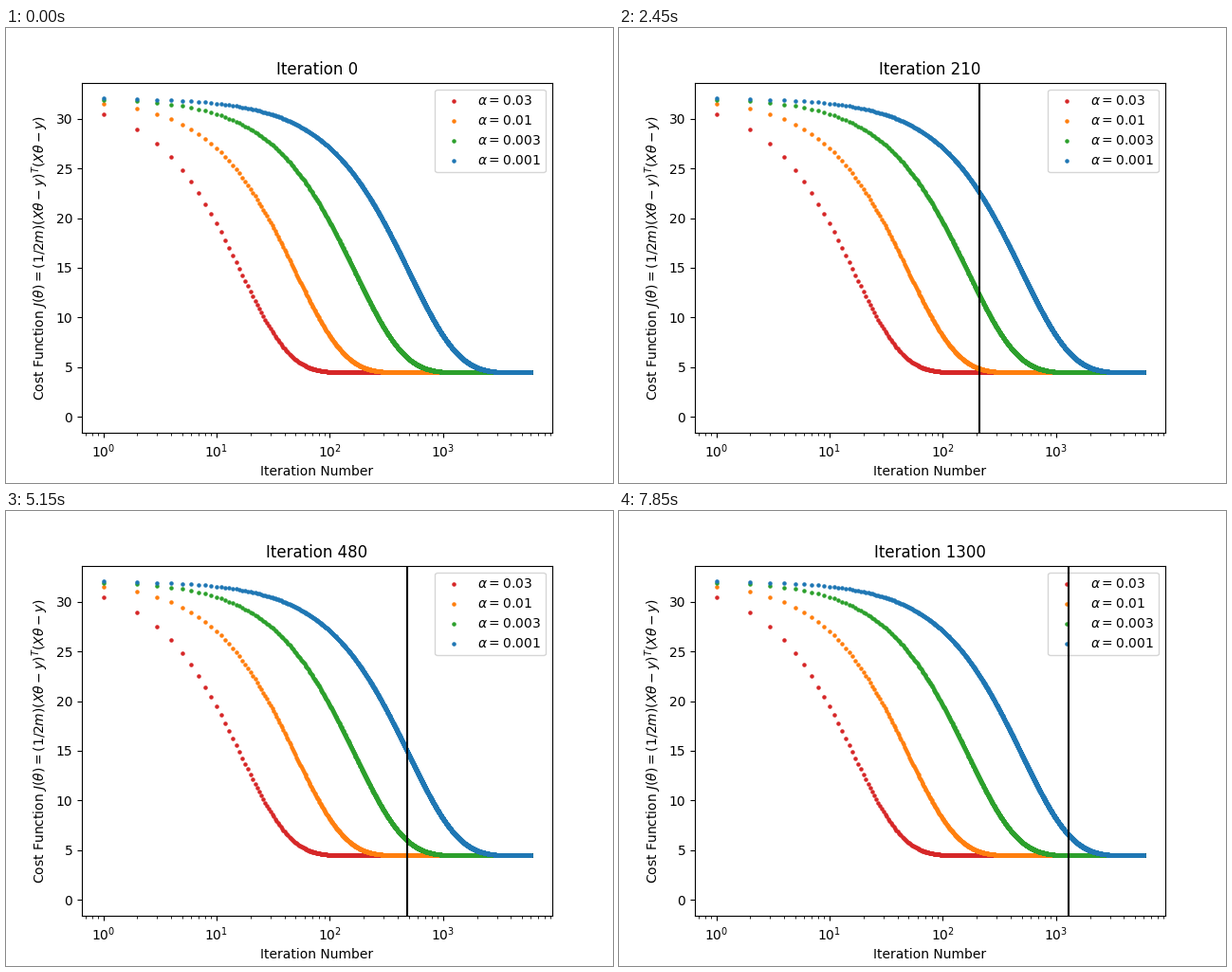
Animation of 640x480 px, one loop 8000 ms. Source, as a matplotlib script:

```python
import numpy as np
import matplotlib.pyplot as plt
from matplotlib.animation import FuncAnimation

TICK = 50            # ms per animation frame
LOOP = 8000          # ms per loop
HOLD, STEP = 500, 150
N = 6000
J_START, J_MIN = 32.0727, 4.477

# Fine steps first, then coarse ones
marks = [*range(0, 500, 15), *range(500, 1301, 50)]

k = np.arange(1, N)
rates = {"0.03": "tab:red", "0.01": "tab:orange",
         "0.003": "tab:green", "0.001": "tab:blue"}


def cost(alpha):
    """Gradient descent cost on one standardised feature."""
    return J_MIN + (J_START - J_MIN) * (1 - alpha) ** (2 * k)


fig, ax = plt.subplots(figsize=(6.4, 4.8), dpi=100)
for rate, color in rates.items():
    ax.scatter(k, cost(float(rate)), s=5, color=color, linewidths=1,
               label=rf"$\alpha = {rate}$")

top = cost(0.001)[0]
ax.set_xscale("log")
ax.set_xlim((N - 1) ** -0.05, (N - 1) ** 1.05)
ax.set_ylim(-0.05 * top, 1.05 * top)
ax.set_xlabel("Iteration Number")
ax.set_ylabel(r"Cost Function $J(\theta) = (1/2m)(X\theta - y)^T(X\theta - y)$")
ax.legend(loc="upper right")
title = ax.set_title("Iteration 0")
cursor = ax.axvline(1, color="black", lw=1.5, zorder=6, visible=False)


def update(frame):
    t = frame * TICK
    i = 0 if t < HOLD else 1 + (t - HOLD) // STEP
    it = marks[i]
    title.set_text(f"Iteration {it}")
    cursor.set_visible(it > 0)      # zero has no place on a log axis
    if it:
        cursor.set_xdata([it, it])
    return title, cursor


anim = FuncAnimation(fig, update, frames=LOOP // TICK, interval=TICK,
                     repeat=True, repeat_delay=0)
plt.show()
```
